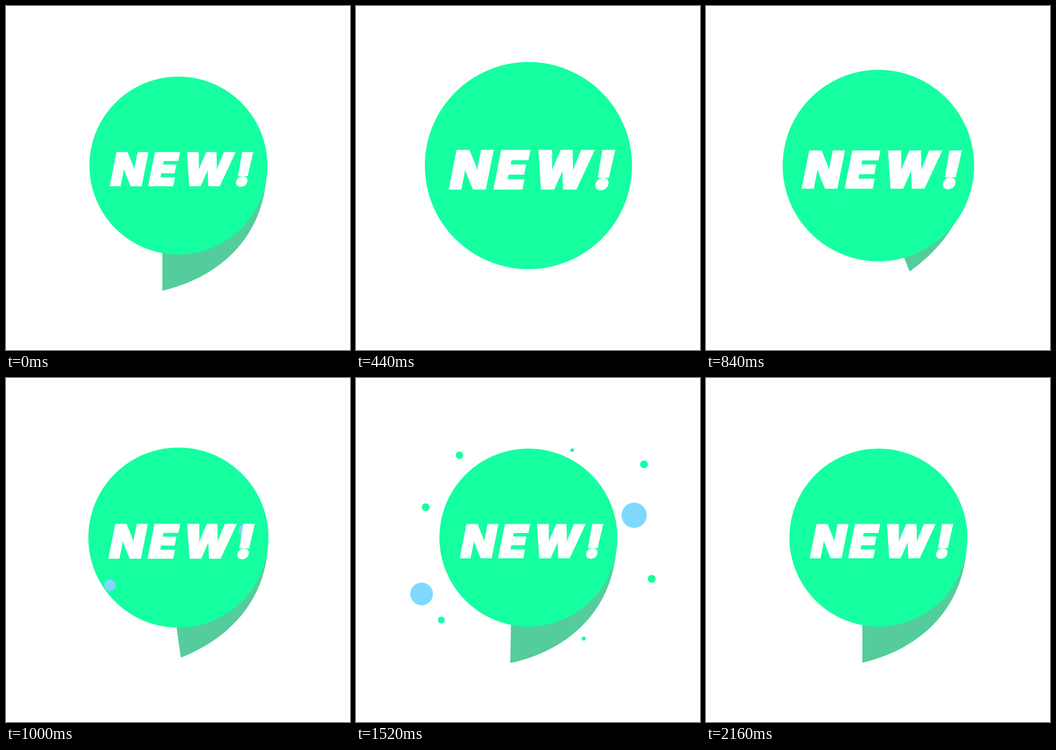
An HTML page for the animation above (2800 ms loop, 748 px wide and 748 px high).

```html
<!DOCTYPE html>
<html lang="en">
<head>
<meta charset="utf-8">
<title>New badge</title>
<style>
  html, body { margin: 0; width: 100%; height: 100%; overflow: hidden; background: #fff; }
  svg { display: block; width: 100vw; height: 100vh; }
  text {
    font: 900 97px Inter, "Open Sans", sans-serif;
    font-optical-sizing: none;
    text-anchor: middle;
    fill: #fff;
    stroke: #fff;
    stroke-width: 4px;
  }
</style>
</head>
<body>
<svg viewBox="0 0 748 748">
  <path id="tail" fill="#54cc9b" d="M340 619C476 587 568 490 567 347H340Z"/>
  <circle id="disc" cx="374.9" cy="347" r="193.5" fill="#15ffa1"/>
  <g id="greens" fill="#15ffa1"></g>
  <g id="blues" fill="#7fd9ff"></g>
  <g id="label">
    <g transform="translate(0 389.7) skewX(-11.3)">
      <text x="260.5 336.5 432 511" y="0">NEW!</text>
    </g>
  </g>
</svg>
<script>
const LOOP = 2800, STEP = 40, END = 2160;
const byId = id => document.getElementById(id);
const tail = byId('tail'), disc = byId('disc'), label = byId('label');

// Dots: group, start time, from x, y, to x, y, full radius
const dots = [
  ['blues', 780, 416, 373.8, 611, 296, 28.4],
  ['blues', 815, 311, 431.5, 136.5, 471, 25.6],
  ['greens', 860, 409.5, 323, 635.5, 182, 8.9],
  ['greens', 840, 442, 413.5, 651, 437.5, 8.9],
  ['greens', 880, 346.6, 451, 502, 572, 4.7],
  ['greens', 1100, 366, 365, 482, 133, 4.5],
  ['greens', 1080, 349, 339, 212, 150, 8.8],
  ['greens', 1080, 328, 347, 133, 274, 9.3],
  ['greens', 1080, 343, 374, 169, 542, 8.2]
].map(([group, start, x0, y0, x1, y1, r]) => {
  const el = document.createElementNS('http://www.w3.org/2000/svg', 'circle');
  byId(group).append(el);
  return { el, start, x0, y0, x1, y1, r };
});

const mix = (a, b, p) => a + (b - a) * p;
const span = (t, a, b) => Math.min(1, Math.max(0, (t - a) / (b - a)));

// Ease with horizontal handles at both ends
function ease(x, h1, h2) {
  let lo = 0, hi = 1;
  for (let i = 0; i < 24; i++) {
    const s = (lo + hi) / 2, q = 1 - s;
    if (3 * q * q * s * h1 + 3 * q * s * s * h2 + s * s * s < x) lo = s; else hi = s;
  }
  return lo * lo * (3 - 2 * lo);
}

// Swell and settle back: 0 to 1 to 0
const pulse = (t, upAt, downAt) =>
  ease(span(t, upAt, 560), .42, .3) - ease(span(t, downAt, 1120), .42, .5);

function tailAngle(t) {
  if (t < 560) return 36 * ease(span(t, 0, 560), .33, .3);
  if (t < 1240) return mix(36, -.9, ease(span(t, 560, 1240), .38, .58));
  return -.9 * (1 - ease(span(t, 1560, END), .42, .58));
}

function draw(t) {
  disc.setAttribute('r', 193.5 + 33 * pulse(t, 0, 560));
  const size = 1 + .168 * pulse(t, 40, 680);
  label.setAttribute('transform',
    `translate(374.5 346) scale(${size}) translate(-374.5 -346)`);
  tail.setAttribute('transform', `rotate(${-tailAngle(t)} 284 334)`);

  const fade = 1 - span(t, 1800, END) ** 2;
  for (const d of dots) {
    const p = 1 - (1 - span(t, d.start, END)) ** 4.5;
    d.el.setAttribute('cx', mix(d.x0, d.x1, p));
    d.el.setAttribute('cy', mix(d.y0, d.y1, p));
    d.el.setAttribute('r', d.r * p * fade);
  }
}

const begin = performance.now();
function tick() {
  const t = (performance.now() - begin) % LOOP;
  draw(Math.floor(t / STEP) * STEP);
  requestAnimationFrame(tick);
}
tick();
</script>
</body>
</html>
```
